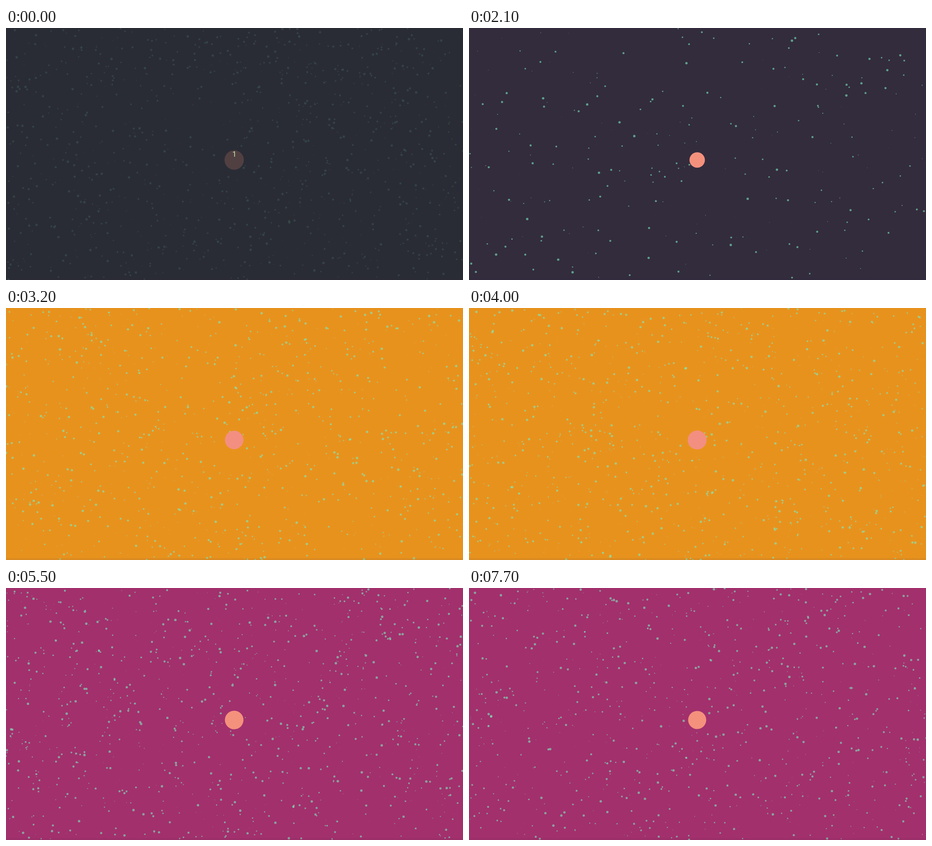
These frames come from a looping animation (1008 px wide and 556 px high, 8000 ms). An HTML page:

```html
<!DOCTYPE html>
<html lang="en">
<head>
<meta charset="utf-8">
<title>Pulsing sphere</title>
<style>
  html, body { margin: 0; width: 100%; height: 100%; overflow: hidden; background: #282c34; }
  svg { display: block; width: 1008px; height: 556px; }
  text { font: 400 16px Roboto, "Liberation Sans", sans-serif; fill: #c8ebaa; text-anchor: middle; }
</style>
</head>
<body>
<svg viewBox="0 0 1008 556">
  <rect width="1008" height="556" fill="#282c34"/>
  <g id="scene">
    <rect id="back" width="1008" height="556"/>
    <g id="dots" fill="#7cedbc" fill-opacity="0.6"></g>
    <rect y="552" width="1008" height="4" fill="#2c2038" fill-opacity="0.07"/>
    <circle id="ball" cx="503.3" cy="291.2"/>
  </g>
  <text id="count" x="503.7" y="284">1</text>
</svg>
<script>
const LOOP = 8000, TICK = 100, FADE = 450;
const W = 1008, H = 556, MAX_DOT = 2.7;

// Runs of even beats, rounded down to the display tick.
const runs = [
  { from: 0, step: 140, total: 4 },
  { from: 760, step: 340, total: 2 },
  { from: 1373, step: 266, total: 12 },
  { from: 4840, step: 340, total: 8 },
  { from: 7540, step: 200, total: 2 }
];
const beats = runs.flatMap(({ from, step, total }) =>
  Array.from({ length: total }, (_, i) => Math.floor((from + i * step) / TICK) * TICK));

// Loudness curve: time and sphere radius at its turning points.
const curve = [[0, 21.3], [700, 21.3], [2100, 17], [3200, 20.4], [5100, 21.6], [6200, 17.8], [LOOP, 20.1]];

const themes = [
  { from: 0, back: "#332c3d", ball: "#f4917d" },
  { from: 2700, back: "#e8921e", ball: "#f38f81" },
  { from: 5500, back: "#a2306d", ball: "#f4917d" }
];

const [scene, back, dots, ball, count] =
  ["scene", "back", "dots", "ball", "count"].map(id => document.getElementById(id));

function radiusAt(t) {
  const i = curve.findIndex(([end]) => end > t);
  const [t0, r0] = curve[i - 1], [t1, r1] = curve[i];
  const ease = (1 - Math.cos(Math.PI * (t - t0) / (t1 - t0))) / 2;
  return r0 + (r1 - r0) * ease;
}

function seeded(seed) {
  let s = seed >>> 0;
  return () => {
    s = (s + 0x6d2b79f5) >>> 0;
    let n = Math.imul(s ^ (s >>> 15), s | 1);
    n ^= n + Math.imul(n ^ (n >>> 7), n | 61);
    return ((n ^ (n >>> 14)) >>> 0) / 4294967296;
  };
}

function scatter(seed, total) {
  const rand = seeded(seed * 7919 + 17);
  let out = "";
  for (let i = 0; i < total; i++) {
    const x = (rand() * W).toFixed(1);
    const y = (rand() * H).toFixed(1);
    const r = (rand() * MAX_DOT).toFixed(2);
    out += `<circle cx="${x}" cy="${y}" r="${r}"/>`;
  }
  return out;
}

function draw(index) {
  const start = beats[index];
  const radius = radiusAt(start);
  const theme = themes.filter(t => t.from <= start).pop();
  back.setAttribute("fill", theme.back);
  ball.setAttribute("fill", theme.ball);
  ball.setAttribute("r", radius.toFixed(2));
  // Louder beats throw more dots.
  dots.innerHTML = scatter(index, Math.round(280 + (radius - 17) * 240));
  scene.setAttribute("opacity", Math.min(1, 0.2 + 0.8 * start / FADE));
  count.setAttribute("visibility", start === 0 ? "visible" : "hidden");
}

let origin = null, shown = 0;

function tick(now) {
  origin ??= now;
  const t = Math.max(0, now - origin) % LOOP;
  const index = beats.filter(b => b <= t).length - 1;
  if (index !== shown) draw(shown = index);
  requestAnimationFrame(tick);
}

draw(shown);
requestAnimationFrame(tick);
</script>
</body>
</html>
```
